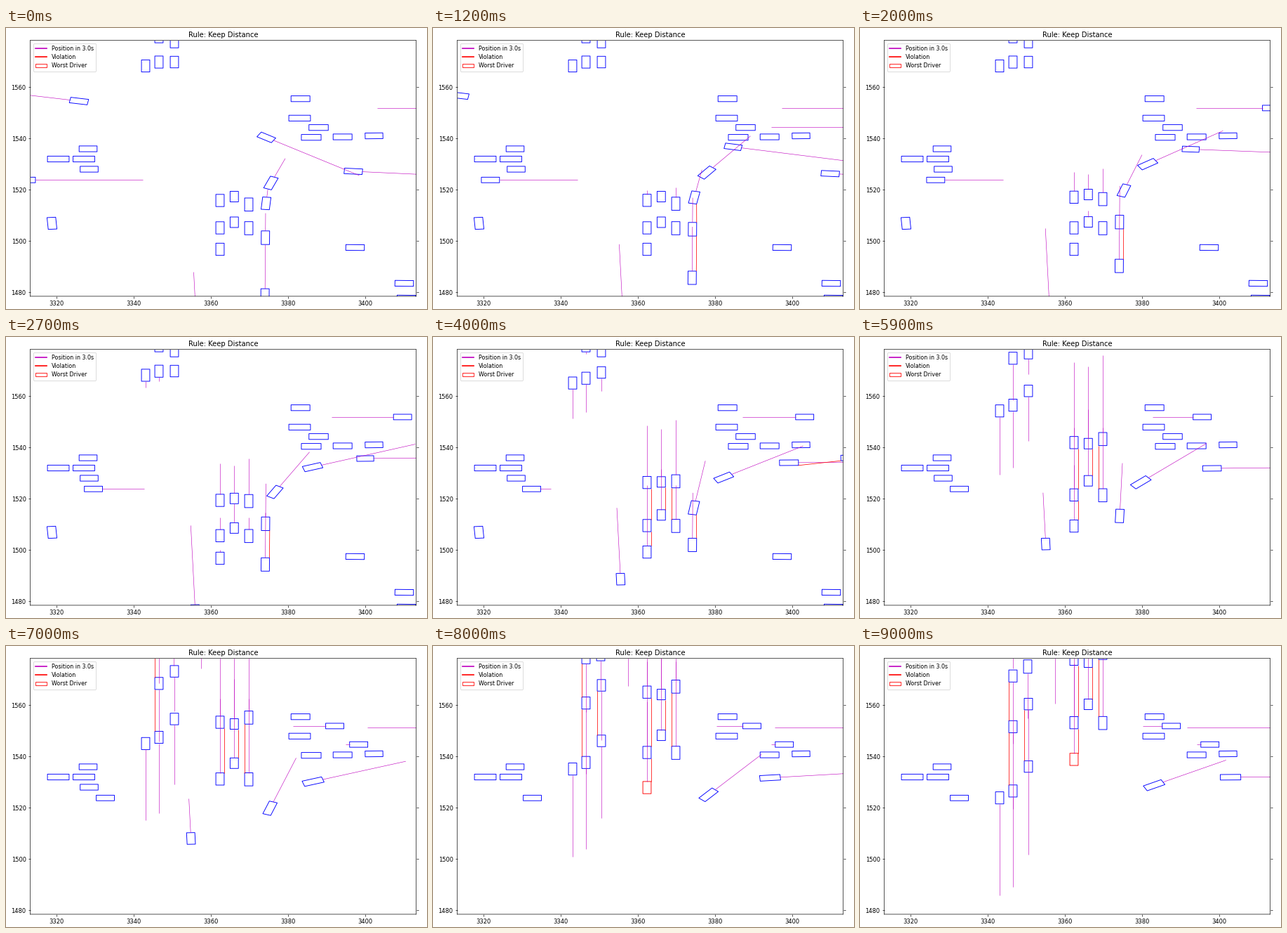
These frames come from a looping animation (600x400 px, 9.1 s). A matplotlib script:

```python
import numpy as np
import matplotlib.pyplot as plt
from matplotlib.animation import FuncAnimation
from matplotlib.collections import LineCollection, PolyCollection
from matplotlib.lines import Line2D
from matplotlib.patches import Patch

W, H, DPI = 600, 400, 60
STEPS, STEP_MS = 91, 100
LEFT, TOP, RIGHT, BOTTOM = 34.5, 17.7, 584.5, 381.9
SCALE = np.array([5.5, -3.65])           # stage pixels per metre
ORIGIN = np.array([3320, 1560])          # metres at stage pixel PIVOT
PIVOT = np.array([72.2, 84.5])
HORIZON = 3.0                            # seconds of forecast
MIN_GAP, MAX_TURN = 2.8, 15              # seconds, degrees
TOP_SPEED, RAMP = 21.1, 8                # shared pull-away profile
EAST, NORTH, WEST, SOUTH = 0, 90, 180, 270


def world(x, y):
    return ORIGIN + (np.array([x, y]) - PIVOT) / SCALE


def unit(degrees):
    a = np.radians(degrees)
    return np.array([np.cos(a), np.sin(a)])


# Paths: metres travelled -> position
def straight(x, y, heading):
    start, ahead = world(x, y), unit(heading)
    return lambda s: start + s * ahead


def bend(p0, p1, p2, lead=60):
    """Quadratic curve with straight run-in and run-out."""
    p0, p1, p2 = world(*p0), world(*p1), world(*p2)
    u = np.linspace(0, 1, 60)[:, None]
    curve = (1 - u) ** 2 * p0 + 2 * u * (1 - u) * p1 + u * u * p2
    run_in = p0 - lead * (p1 - p0) / np.hypot(*(p1 - p0))
    run_out = p2 + lead * (p2 - p1) / np.hypot(*(p2 - p1))
    pts = np.vstack([run_in, curve, run_out])
    dist = np.r_[0, np.cumsum(np.hypot(*np.diff(pts, axis=0).T))] - lead
    return lambda s: np.array([np.interp(s, dist, pts[:, k]) for k in (0, 1)])


# Motions: time -> (metres travelled, speed)
def pull_away(start):
    def motion(t):
        u = max(t - start, 0)
        rise = 1 - np.exp(-u / RAMP)
        return TOP_SPEED * (u - RAMP * rise), TOP_SPEED * rise
    return motion


def drift(v=0, a=0, s=0):
    def motion(t):
        u = min(t, -v / a) if a < 0 else t
        return s + v * u + a * u * u / 2, v + a * u
    return motion


class Car:
    def __init__(self, path, motion, length=4.7, width=2.15, since=0, until=99, color="b"):
        self.path, self.motion = path, motion
        self.length, self.width = length, width
        self.since, self.until, self.color = since, until, color

    def visible(self, t):
        return self.since <= t < self.until

    def move(self, t):
        s, self.speed = self.motion(t)
        self.pos = self.path(s)
        d = self.path(s + 0.5) - self.path(s - 0.5)
        self.ahead = d / np.hypot(*d)

    def point(self, along, side):
        """along: 1 front, -1 rear; side: 1 left, -1 right."""
        left = np.array([-self.ahead[1], self.ahead[0]])
        return self.pos + (along * self.length * self.ahead + side * self.width * left) / 2

    def outline(self):
        return [self.point(*c) for c in ((1, 1), (1, -1), (-1, -1), (-1, 1))]

    def forecast(self):
        nose = self.point(1, 0)
        return [nose, nose + HORIZON * self.speed * self.ahead]

    def too_close(self, lead):
        gap = np.hypot(*(lead.point(-1, 0) - self.point(1, 0)))
        aligned = self.ahead @ lead.ahead > np.cos(np.radians(MAX_TURN))
        return aligned and gap < MIN_GAP * self.speed


def lane(x, heading, length, *cars):
    return [Car(straight(x, y, heading), pull_away(start), length) for y, start in cars]


def row(length, *spots, heading=EAST, until=99):
    return [Car(straight(x, y, heading), drift(), length, 2.25, until=until) for x, y in spots]


parked = (
    row(4.65, (117, 172)) + row(4.65, (118.5, 201), until=8)
    + row(5.6, (74.5, 186.5), (111, 186.5), (418.5, 128.3))
    + row(4.9, (419.7, 100.7), (479.7, 155))
    + row(4.6, (524.5, 153.5), heading=1)
    + row(5, (445.5, 141.7), until=6.5) + row(5.1, (435, 155.7), until=8)
    + row(4.8, (497.5, 312.5), (567.5, 363.5), (570.5, 384.5), heading=-1, until=5)
    + row(4.6, (65.5, 278), heading=94, until=5)
)

# Each lane runs from its first car back: (y, moment of pulling away)
north = [
    lane(305, NORTH, 4.75, (245.5, 1.0), (284.5, 2.1), (315, 2.6)),
    lane(325.3, NORTH, 4.1, (240, 1.2), (276.5, 1.7)),
    lane(346, NORTH, 5.1, (251.3, 0.7), (285, 2.1)),
]
south = [
    lane(199, SOUTH, 4.7, (54, 2.4)),
    lane(218, SOUTH, 4.7, (48.5, 2.5), (12.5, 3.9), (-17, 5.2), (-45, 7)),
    lane(240, SOUTH, 4.5, (48.5, 3.35), (20, 5.1)),
    lane(239, SOUTH, 5.2, (0, 6.4)),
]
slow = north[0][2]
slow.until = 6.4
worst = Car(slow.path, slow.motion, slow.length, since=8, color="r")
north[0].append(worst)

turn = bend((370, 258), (370.5, 188), (501, 187))
wide_turn = bend((370, 250), (370.5, 180), (501, 179))
merge = bend((371, 155.7), (415, 174), (510, 173))
turning = [
    Car(merge, drift(8.7, 0.8), 4.4, until=4.6),
    Car(wide_turn, drift(2.6, 2.2, 8.2), 4.9, until=5.4),
    Car(turn, drift(1, 1.55, 2.3), 4.8, until=6.8),
    Car(turn, drift(2.3, 0.75, -11.1), 5.3),
    Car(turn, drift(5.7, 0.05, -33.6), 5.2),
]

through = [
    Car(straight(495, 204, -4), drift(10.5, 0.5), until=2),
    Car(straight(104, 104, 170), drift(10.2), until=2),
    Car(straight(29, 216.3, EAST), drift(9.27, -2.1)),
    Car(straight(276, 509, 92), drift(14, -1.37), 4.5, until=8),
    Car(straight(656, 113.9, WEST), drift(6.9, -0.58)),
    Car(straight(646, 140.8, WEST), drift(6.55), since=0.8, until=1.9),
    Car(straight(516.5, 140.2, WEST), drift(0.36), since=6.4),
    Car(straight(1308, 115.5, WEST), drift(21, -1.5), since=6.5),
    Car(straight(278, -227, SOUTH), drift(6.85), since=6.2),
]

# (queue, side on which alerts are drawn)
LANE_SIDE = list(zip(north + south + [turning], (-1, -1, 1, -1, -1, -1, -1, -1)))
CARS = parked + through + [c for queue, _ in LANE_SIDE for c in queue]

fig = plt.figure(figsize=(W / DPI, H / DPI), dpi=DPI)
ax = fig.add_axes([LEFT / W, 1 - BOTTOM / H, (RIGHT - LEFT) / W, (BOTTOM - TOP) / H])
(x0, y1), (x1, y0) = world(LEFT, TOP), world(RIGHT, BOTTOM)
ax.set(xlim=(x0, x1), ylim=(y0, y1), title="Rule: Keep Distance",
       xticks=range(3320, 3401, 20), yticks=range(1480, 1561, 20))
ax.tick_params(right=True)
for spine in ax.spines.values():
    spine.set_snap(False)
ax.legend(handles=[Line2D([], [], color="m", lw=2, label="Position in 3.0s"),
                   Line2D([], [], color="r", lw=2, label="Violation"),
                   Patch(facecolor="none", edgecolor="r", label="Worst Driver")],
          loc="upper left", fontsize=9.6, labelspacing=0.4, handletextpad=0.9)

forecasts = ax.add_collection(LineCollection([], colors="m", linewidths=0.7))
alerts = ax.add_collection(LineCollection([], colors="r", linewidths=0.9))
boxes = ax.add_collection(PolyCollection([], facecolors="none", linewidths=1.1, snap=False))


def draw(i):
    t = i * STEP_MS / 1000
    cars = [c for c in CARS if c.visible(t)]
    for c in cars:
        c.move(t)
    boxes.set_verts([c.outline() for c in cars])
    boxes.set_edgecolor([c.color for c in cars])
    forecasts.set_segments([c.forecast() for c in cars if c.speed > 0.2])
    segments = []
    for queue, side in LANE_SIDE:
        present = [c for c in queue if c.visible(t)]
        segments += [[lead.point(-1, side), c.point(1, side)]
                     for lead, c in zip(present, present[1:]) if c.too_close(lead)]
    alerts.set_segments(segments)
    return boxes, forecasts, alerts


anim = FuncAnimation(fig, draw, frames=STEPS, interval=STEP_MS, repeat=True, repeat_delay=0)
plt.show()
```
